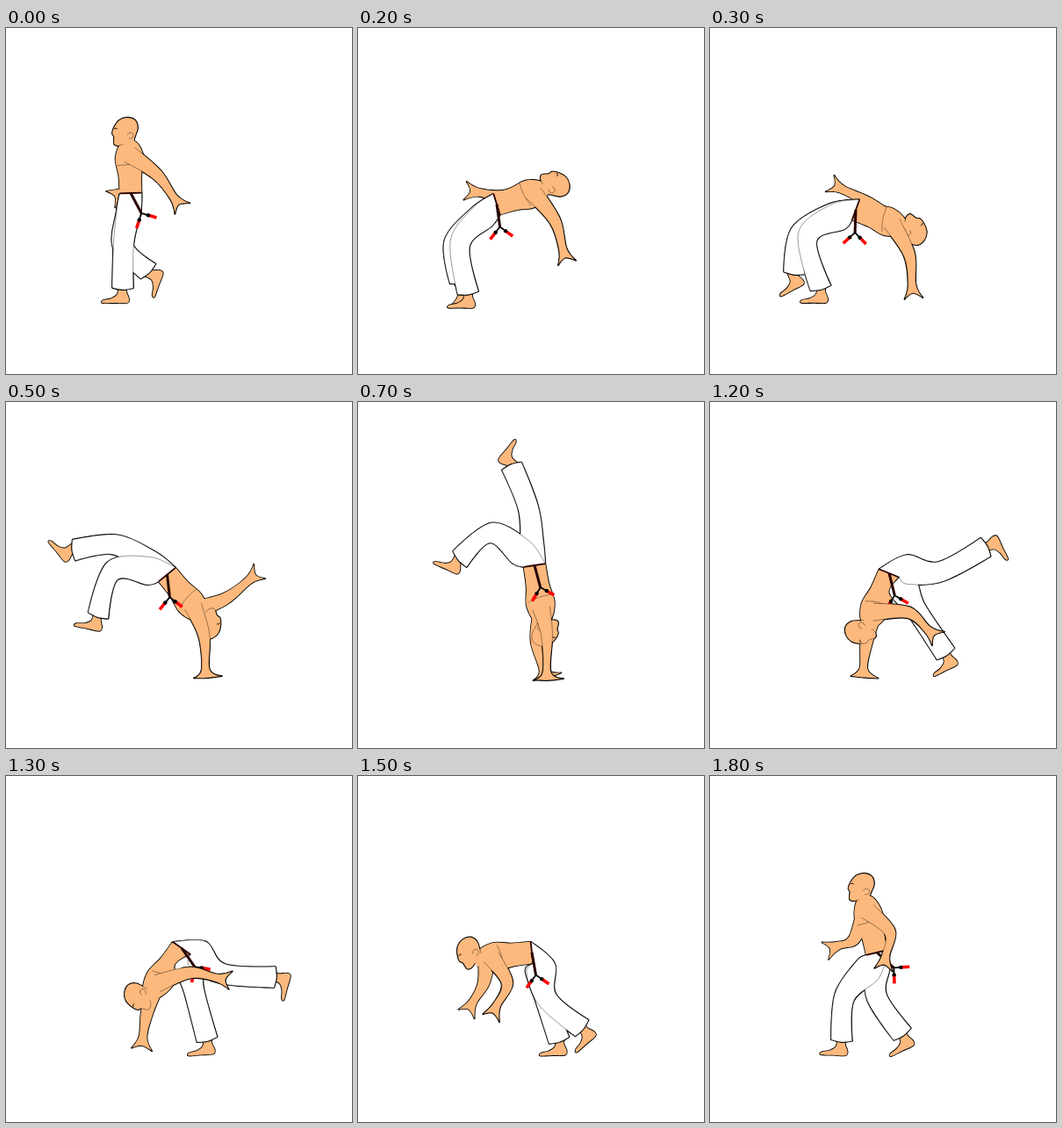
An HTML page with a canvas for the animation above (1900 ms loop, 394 px wide and 394 px high).

```html
<!DOCTYPE html>
<html lang="en">
<head>
<meta charset="utf-8">
<title>Back walkover</title>
<style>
html, body { margin: 0; width: 100%; height: 100%; overflow: hidden; background: #fff; }
canvas { display: block; width: 394px; height: 394px; }
</style>
</head>
<body>
<canvas id="stage" width="394" height="394"></canvas>
<script>
const ctx = document.getElementById('stage').getContext('2d');
const SIZE = 394, STEP = 100, STEPS = 19;
const SKIN = '#fdb97d', INK = '#000', BELT = '#260000', RED = '#f00';

// Joints of the key poses. Arms are elbow and wrist, legs are knee and ankle;
// head, feet and cord are angles in degrees, with feet listed far, near.
const poses = [
  { at: 0, hip: [142, 188], neck: [140, 130], head: 0, feet: [-70, 0], cord: 62,
    farArm: [146, 180, 133, 187], nearArm: [172, 167, 191, 193],
    farLeg: [133, 248, 162, 277], nearLeg: [134, 245, 133, 296] },
  { at: 3, hip: [166, 207], neck: [220, 227], head: 125, feet: [-28, 0], cord: 92,
    farArm: [180, 199, 151, 184], nearArm: [227, 258, 230, 292],
    farLeg: [101, 236, 96, 279], nearLeg: [111, 238, 126, 296] },
  { at: 7, hip: [201, 186], neck: [211, 250], head: 190, feet: [129, 24], cord: 75,
    farArm: [203, 272, 211, 305], nearArm: [215, 265, 215, 307],
    farLeg: [194, 121, 175, 73], nearLeg: [151, 149, 116, 179] },
  { at: 10, hip: [212, 193], neck: [215, 252], head: 185, feet: [288, 163], cord: 118,
    farArm: [214, 278, 214, 308], nearArm: [247, 264, 241, 288],
    farLeg: [269, 206, 328, 226], nearLeg: [235, 130, 232, 75] },
  { at: 13, hip: [200, 196], neck: [163, 249], head: 280, feet: [356, 285], cord: 55,
    farArm: [160, 272, 156, 297], nearArm: [210, 224, 240, 230],
    farLeg: [214, 244, 229, 300], nearLeg: [246, 225, 306, 229] },
  { at: 15, hip: [198, 201], neck: [137, 208], head: 325, feet: [358, 319], cord: 80,
    farArm: [143, 236, 131, 257], nearArm: [170, 236, 158, 261],
    farLeg: [212, 250, 229, 301], nearLeg: [216, 255, 255, 287] },
  { at: 18, hip: [190, 201], neck: [176, 139], head: 363, feet: [334, 362], cord: 42,
    farArm: [164, 186, 146, 193], nearArm: [205, 178, 200, 205],
    farLeg: [190, 252, 219, 294], nearLeg: [153, 252, 150, 301] }
];

const points = s => s.split(' ').map(p => p.split(',').map(Number));
const HEAD = points('-3,16 -9,18 -14,16 -14,8 -16,4 -14,-3 -8,-11 1,-14 10,-11 13,-2 9,11 11,20 -3,21');
const EYE = points('-14,-1 -12,-2 -10,-1');
const EAR = points('1,6 4,3 8,5 7,9 3,10');
const FOOT = points('-5,-6 -6,3 -13,8 -22,10 -23,13 -9,13 5,13 7,8 4,0 5,-6');

const { PI, cos, sin, atan2, hypot, min, max } = Math;
const rad = deg => deg * PI / 180;
const mix = (a, b, u) => a + (b - a) * u;
const mixPt = (p, q, u) => [mix(p[0], q[0], u), mix(p[1], q[1], u)];
const add = (p, q) => [p[0] + q[0], p[1] + q[1]];
const sub = (p, q) => [p[0] - q[0], p[1] - q[1]];
const scale = (p, k) => [p[0] * k, p[1] * k];
const dir = (p, q) => scale(sub(q, p), 1 / hypot(...sub(q, p)));
const polar = (r, a) => [r * cos(a), r * sin(a)];
const spin = ([x, y], a) => [x * cos(a) - y * sin(a), x * sin(a) + y * cos(a)];
const offset = (p, d, along, side) =>
  [p[0] + d[0] * along + d[1] * side, p[1] + d[1] * along - d[0] * side];

// Bones turn with the clockwise roll and only swing back through less than 100 degrees.
function turnBone(a, b, u) {
  const from = atan2(a[1], a[0]);
  let turn = atan2(b[1], b[0]) - from;
  while (turn < rad(-100)) turn += 2 * PI;
  while (turn > rad(260)) turn -= 2 * PI;
  return polar(mix(hypot(...a), hypot(...b), u), from + turn * u);
}

const ROOT = { farArm: 0.84, nearArm: 0.76, farLeg: 0, nearLeg: 0 };

// Joint chain of a limb: root on the spine, middle joint, end joint.
const chain = (pose, name) => [
  mixPt(pose.hip, pose.neck, ROOT[name]), pose[name].slice(0, 2), pose[name].slice(2)
];

function between(A, B, u) {
  const hip = mixPt(A.hip, B.hip, u);
  const neck = add(hip, turnBone(sub(A.neck, A.hip), sub(B.neck, B.hip), u));
  const pose = {
    hip, neck,
    head: rad(mix(A.head, B.head, u)),
    cord: rad(mix(A.cord, B.cord, u)),
    feet: A.feet.map((f, i) => rad(mix(f, B.feet[i], u)))
  };
  for (const name in ROOT) {
    const a = chain(A, name), b = chain(B, name);
    const joints = [mixPt(hip, neck, ROOT[name])];
    for (let i = 0; i < 2; i++) {
      joints.push(add(joints[i], turnBone(sub(a[i + 1], a[i]), sub(b[i + 1], b[i]), u)));
    }
    pose[name] = joints;
  }
  return pose;
}

function curve(pts, corners = []) {
  const path = new Path2D(), last = pts.length - 1;
  const slope = i => corners.includes(i) ? [0, 0]
    : scale(sub(pts[min(i + 1, last)], pts[max(i - 1, 0)]), 1 / 6);
  path.moveTo(...pts[0]);
  for (let i = 0; i < last; i++) {
    path.bezierCurveTo(...add(pts[i], slope(i)), ...sub(pts[i + 1], slope(i + 1)), ...pts[i + 1]);
  }
  return path;
}

// Outline around stations of [point, direction, back width, front width].
function tube(stations, corners, tip = []) {
  const back = stations.map(([p, d, w]) => offset(p, d, 0, w));
  const front = stations.map(([p, d, w, f = w]) => offset(p, d, 0, -f)).reverse();
  return curve([...back, ...tip, ...front], corners);
}

function torsoPath({ hip, neck }) {
  const d = dir(hip, neck);
  return tube([[0, 12.5], [0.35, 13], [0.7, 16], [1, 8]].map(([t, w]) => [mixPt(hip, neck, t), d, w]));
}

function armPath([shoulder, elbow, wrist]) {
  const fore = dir(elbow, wrist);
  const flat = min(1, max(0, (wrist[1] - 295) / 10)); // hand spreads on the floor
  const hand = [
    offset(wrist, fore, mix(16, 8, flat), mix(11, 19, flat)),
    offset(wrist, fore, 10, 0),
    offset(wrist, fore, mix(16, 9, flat), mix(-10, -14, flat))
  ];
  return tube([
    [shoulder, dir(shoulder, elbow), 10],
    [elbow, dir(shoulder, wrist), 6.5],
    [wrist, fore, 4.5]
  ], [3, 5], hand);
}

function legPath([hip, knee, ankle], neck) {
  const thigh = dir(hip, knee), down = dir(neck, hip);
  // Cloth fills out on the outer side of a bent hip.
  const flex = down[0] * thigh[1] - down[1] * thigh[0];
  return tube([
    [hip, down, 12.5],
    [mixPt(hip, knee, 0.35), thigh, 13 + 8 * max(0, flex), 13 + 8 * max(0, -flex)],
    [knee, dir(hip, ankle), 11.5],
    [ankle, dir(knee, ankle), 12]
  ], [3, 5], [offset(ankle, dir(knee, ankle), 2, 0)]);
}

const shape = (pts, at, angle) => curve(pts.map(p => add(at, spin(p, angle))));
const footPath = ([, knee, ankle], angle) => shape(FOOT, offset(ankle, dir(knee, ankle), 4, 0), angle);

function stroke(path, width, color = INK) {
  ctx.lineWidth = width;
  ctx.strokeStyle = color;
  ctx.stroke(path);
}
function fill(path, color = SKIN) {
  ctx.fillStyle = color;
  ctx.fill(path);
}
const bold = path => stroke(path, 1.8);
const thin = path => stroke(path, 0.4);

function clipOutside(path) {
  const area = new Path2D();
  area.rect(0, 0, SIZE, SIZE);
  area.addPath(path);
  ctx.clip(area, 'evenodd');
}

function drawCord({ hip, cord }) {
  const fork = add(hip, polar(26, cord));
  stroke(curve([hip, fork]), 3, BELT);
  for (const side of [-0.8, 0.8]) {
    const end = add(fork, polar(8, cord + side)), tip = add(fork, polar(18, cord + side));
    stroke(curve([fork, end]), 1.8);
    stroke(curve([end, tip]), 3.6, RED);
    const bead = new Path2D();
    bead.arc(...end, 2.2, 0, 2 * PI);
    fill(bead, INK);
  }
}

function draw(step) {
  let k = poses.length - 2;
  while (poses[k].at > step) k--;
  const A = poses[k], B = poses[k + 1];
  const pose = between(A, B, (step - A.at) / (B.at - A.at));
  const { hip, neck } = pose, spine = dir(hip, neck);

  const skull = sub(neck, spin([3, 14], pose.head));
  const torso = torsoPath(pose), head = shape(HEAD, skull, pose.head);
  const farArm = armPath(pose.farArm), nearArm = armPath(pose.nearArm);
  const legs = [pose.farLeg, pose.nearLeg];
  const trousers = legs.map(leg => legPath(leg, neck));

  ctx.fillStyle = '#fff';
  ctx.fillRect(0, 0, SIZE, SIZE);
  ctx.lineJoin = 'round';

  const skin = [farArm, torso, head];
  skin.forEach(bold);
  skin.forEach(p => fill(p));
  thin(shape(HEAD.slice(0, -2), skull, pose.head));
  stroke(shape(EYE, skull, pose.head), 0.9);
  thin(shape(EAR, skull, pose.head));
  const chest = mixPt(hip, neck, 0.55);
  thin(curve([offset(chest, spine, 0, 15), offset(chest, spine, 1, 0), offset(chest, spine, 5, -13)]));

  legs.forEach((leg, i) => {
    const foot = footPath(leg, pose.feet[i]);
    bold(foot);
    fill(foot);
  });
  trousers.forEach(bold);
  for (const leg of trousers) {
    fill(leg, '#fff');
    thin(leg);
  }

  stroke(curve([offset(hip, spine, 0, 12.5), offset(hip, spine, 0, -12.5)]), 1.8, BELT);
  drawCord(pose);

  ctx.save();
  clipOutside(torso);
  clipOutside(head);
  bold(nearArm);
  ctx.restore();
  fill(nearArm);
  thin(nearArm);
}

let shown = -1;
function tick() {
  const step = Math.floor(performance.now() / STEP) % STEPS;
  if (step !== shown) draw(shown = step);
  requestAnimationFrame(tick);
}
tick();
</script>
</body>
</html>
```
